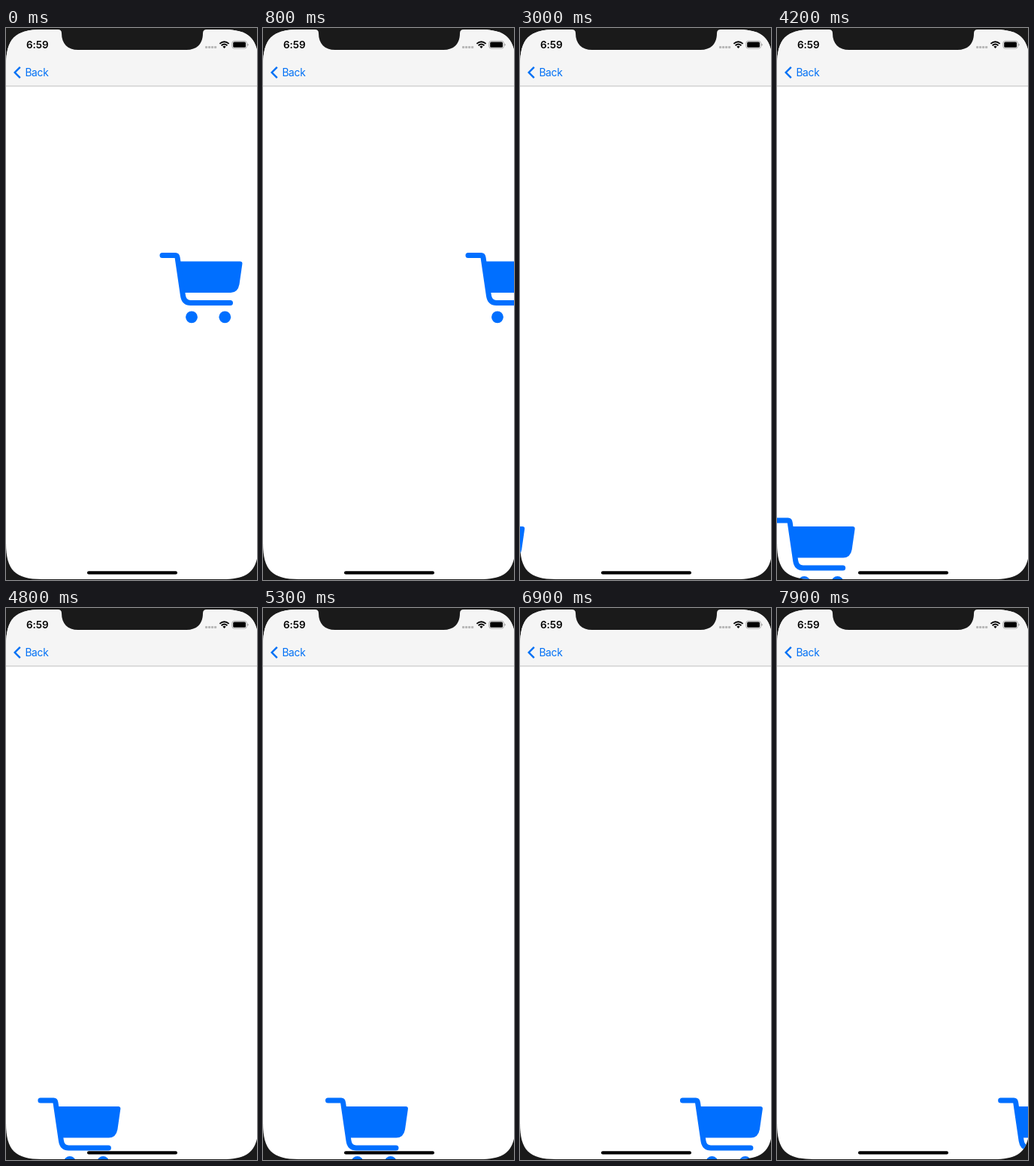
These frames come from a looping animation (334x732 px, 8 s). An HTML page:

```html
<!DOCTYPE html>
<html lang="en">
<head>
<meta charset="utf-8">
<title>Cart drive</title>
<style>
  html, body { margin: 0; width: 100%; height: 100%; overflow: hidden; background: #1a1a1a; }
  svg { display: block; width: 334px; height: 732px; }
  text { font-family: Inter, Roboto, sans-serif; }
</style>
</head>
<body>
<svg viewBox="0 0 334 732" xmlns="http://www.w3.org/2000/svg">
  <defs>
    <clipPath id="screen">
      <path d="M0 50C0 14 12 2 48 2H288C324 2 336 14 336 50V683C336 719 324 731 288 731H48C12 731 0 719 0 683Z"/>
    </clipPath>
  </defs>
  <rect width="334" height="732" fill="#1a1a1a"/>
  <g clip-path="url(#screen)">
    <rect width="336" height="732" fill="#fff"/>
    <g id="cart" fill="#006fff">
      <path d="M25 11.5H107Q110.4 11.5 109.9 15L106 42Q104 53 94.5 53H32Z"/>
      <path d="M3.5 3.5H21Q23.2 3.5 23.6 6.5L31 57Q32.4 66.5 41 66.5H94" fill="none"
        stroke="#006fff" stroke-width="7" stroke-linecap="round"/>
      <circle cx="42.5" cy="85.3" r="7.9"/>
      <circle cx="86.8" cy="85.3" r="7.9"/>
    </g>
    <rect width="336" height="77" fill="#f5f5f5"/>
    <rect y="76.4" width="336" height="1.2" fill="#c9c9c9"/>
  </g>

  <!-- notch -->
  <path d="M69 0V2Q74 2 74 7C74 21 82 29 96 29H240C254 29 262 21 262 7Q262 2 267 2V0Z" fill="#1a1a1a"/>

  <!-- status bar -->
  <text x="27" y="27" font-size="13.5" font-weight="600" letter-spacing="-0.1">6:59</text>
  <g fill="#b9b9b9">
    <rect x="265" y="24" width="3.2" height="3" rx=".7"/>
    <rect x="269" y="24" width="3.2" height="3" rx=".7"/>
    <rect x="273" y="24" width="3.2" height="3" rx=".7"/>
    <rect x="277" y="24" width="3.2" height="3" rx=".7"/>
  </g>
  <g fill="none" stroke="#000" stroke-width="1.9">
    <path d="M284.4 20.9Q290.5 15.4 296.6 20.9"/>
    <path d="M286.6 23.3Q290.5 19.9 294.4 23.3"/>
  </g>
  <path d="M288.4 24.7Q290.5 23 292.6 24.7L290.5 27Z"/>
  <rect x="300.8" y="17.3" width="19.6" height="9.8" rx="2.8" fill="none" stroke="#a3a3a3" stroke-width=".9"/>
  <rect x="302.2" y="18.6" width="16.8" height="7.2" rx="1.5"/>
  <path d="M321.4 20.6Q322.7 21 322.7 22.2T321.4 23.8Z" fill="#a3a3a3"/>

  <!-- navigation -->
  <path d="M18.8 51.8L11.7 59L18.8 66.2" fill="none" stroke="#0070f5" stroke-width="2.4"/>
  <text x="25.4" y="64" font-size="13.8" letter-spacing="-0.3" fill="#0070f5">Back</text>

  <rect x="108" y="720.3" width="120" height="4.2" rx="2.1"/>
</svg>
<script>
  const LOOP = 8000, STEP = 100, SPEED = 0.0812;
  const cart = document.getElementById('cart');

  // Two straight drives at constant speed: mid-screen, then along the bottom.
  function place(t) {
    return t < 2000
      ? [204.5 + SPEED * t, 298]
      : [83 + SPEED * (t - 5300), 649.6];
  }

  function draw(ms) {
    const t = Math.floor((ms % LOOP) / STEP) * STEP;
    const [x, y] = place(t);
    cart.setAttribute('transform', `translate(${x.toFixed(2)} ${y})`);
  }

  const start = performance.now();
  function tick() {
    draw(performance.now() - start);
    requestAnimationFrame(tick);
  }
  tick();
</script>
</body>
</html>
```
